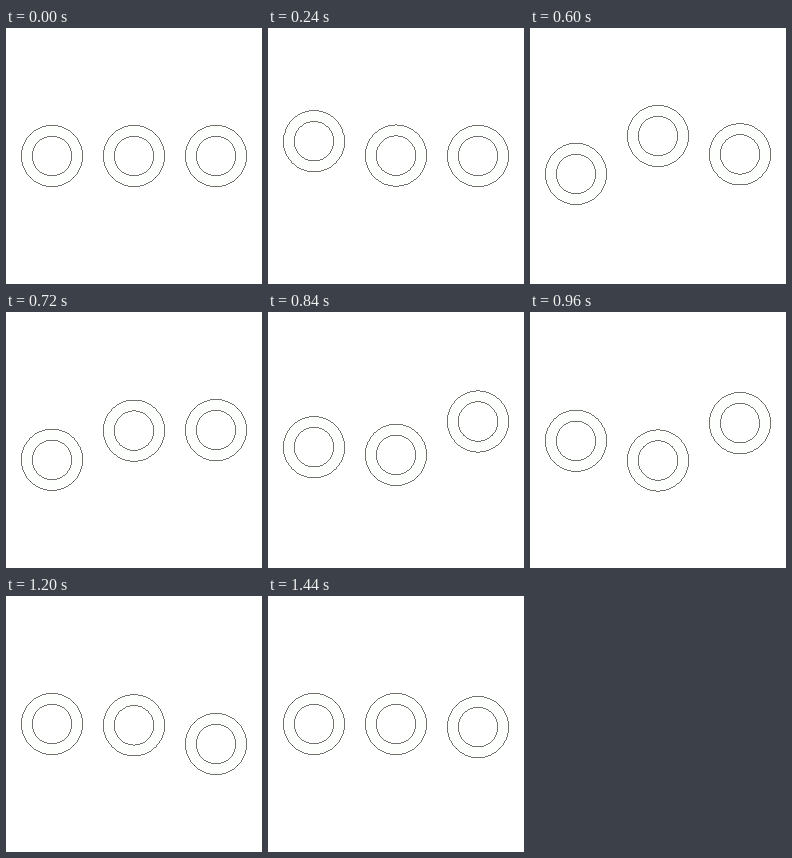
Write an HTML page that moves like this. It is 256x256 px and loops after 1.5 s.

```html
<!DOCTYPE html>
<html lang="en">
<head>
<meta charset="utf-8">
<title>Bouncing rings</title>
<style>
  html, body { margin: 0; width: 100%; height: 100%; overflow: hidden; background: #fff; }
  svg { display: block; width: 100%; height: 100%; }
  /* Thin strokes without smoothing give fine, slightly broken outlines */
  circle { stroke: #14160f; stroke-width: .6; shape-rendering: crispEdges; }
</style>
</head>
<body>
<svg viewBox="0 0 256 256">
  <defs>
    <g id="ring">
      <circle r="30.7" fill="#fdfffc"/>
      <circle r="19.8" fill="#fff"/>
    </g>
  </defs>
  <use href="#ring"/>
  <use href="#ring"/>
  <use href="#ring"/>
</svg>
<script>
  const LOOP = 1500, SWING = 20.5;
  // Times in ms: start, highest point, lowest point, rest
  const rings = [
    { x: 46, keys: [10, 365, 690, 1040] },
    { x: 128, keys: [205, 642, 967, 1290] },
    { x: 210, keys: [535, 915, 1243, 1575] },
  ];
  const heights = [0, -SWING, SWING, 0];
  const nodes = document.querySelectorAll('use');

  const smooth = t => t * t * (3 - 2 * t);

  // cubic-bezier(.3, 0, .3, 1), solved by bisection
  function ease(x) {
    let low = 0, high = 1;
    for (let i = 0; i < 20; i++) {
      const t = (low + high) / 2;
      if (0.9 * t * (1 - t) + t ** 3 < x) low = t; else high = t;
    }
    return smooth(low);
  }

  function offset(keys, time) {
    if (time <= keys[0] || time >= keys[3]) return 0;
    const i = time < keys[1] ? 0 : time < keys[2] ? 1 : 2;
    const p = (time - keys[i]) / (keys[i + 1] - keys[i]);
    const curve = i ? ease : smooth;
    return heights[i] + (heights[i + 1] - heights[i]) * curve(p);
  }

  function draw(now) {
    const time = now % LOOP;
    rings.forEach(({ x, keys }, i) => {
      nodes[i].setAttribute('transform', `translate(${x} ${128 + offset(keys, time)})`);
    });
    requestAnimationFrame(draw);
  }
  draw(0);
</script>
</body>
</html>
```
